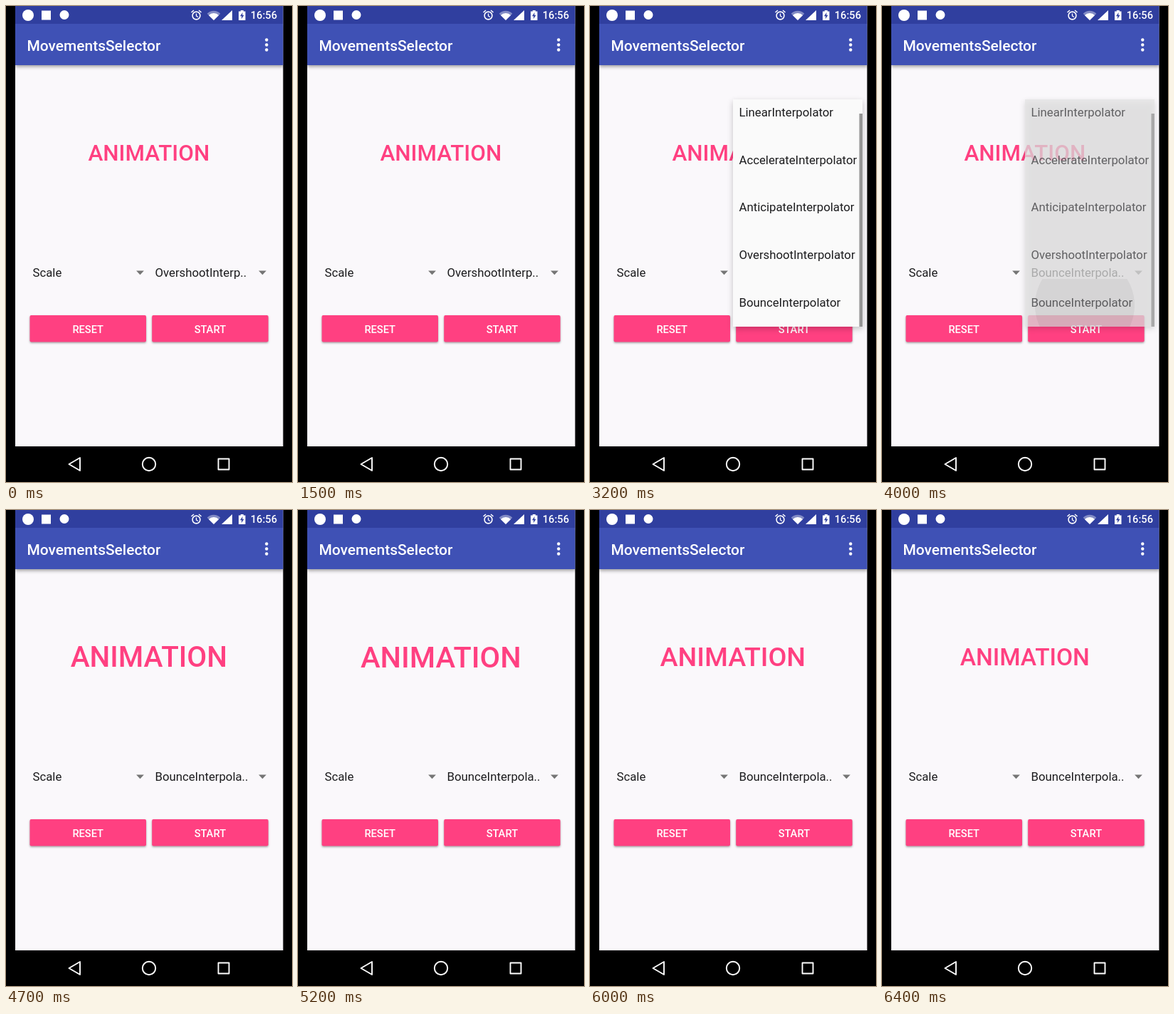
These frames come from a looping animation (402 px wide and 668 px high, 6.5 s). An HTML page with a canvas:

```html
<!DOCTYPE html>
<html lang="en">
<head>
<meta charset="utf-8">
<title>Interpolator demo</title>
<style>
  html, body { margin: 0; width: 100%; height: 100%; overflow: hidden; background: #000; }
  canvas { display: block; width: 402px; height: 668px; }
</style>
</head>
<body>
<canvas id="stage"></canvas>
<script>
const W = 402, H = 668, LOOP = 6500, STEP = 100;
const PINK = '#ff4081', INK = '#1c1c1e', SURFACE = '#faf8fb';
const ITEMS = ['Linear', 'Accelerate', 'Anticipate', 'Overshoot', 'Bounce'];
const POPUP = { x: 201, y: 131, w: 182, h: 319, open: 2480, close: 3930 };

const canvas = document.getElementById('stage');
const ctx = canvas.getContext('2d');
const dpr = window.devicePixelRatio || 1;
canvas.width = W * dpr;
canvas.height = H * dpr;

const clamp = v => Math.max(0, Math.min(1, v));
const smooth = v => v * v * (3 - 2 * v);

function rect(x, y, w, h, color) {
  ctx.fillStyle = color;
  ctx.fillRect(x, y, w, h);
}

function disc(x, y, r, color) {
  ctx.fillStyle = color;
  ctx.beginPath();
  ctx.arc(x, y, r, 0, Math.PI * 2);
  ctx.fill();
}

function ring(x, y, r, width) {
  ctx.lineWidth = width;
  ctx.beginPath();
  ctx.arc(x, y, r, 0, Math.PI * 2);
  ctx.stroke();
}

function trace(points) {
  ctx.beginPath();
  points.forEach(([x, y]) => ctx.lineTo(x, y));
}

function poly(points, color) {
  trace(points);
  ctx.fillStyle = color;
  ctx.fill();
}

function line(points, width) {
  trace(points);
  ctx.lineWidth = width;
  ctx.stroke();
}

function text(str, x, y, size, color, weight = 400, align = 'left') {
  ctx.font = `${weight} ${size}px Roboto, sans-serif`;
  ctx.textAlign = align;
  ctx.fillStyle = color;
  ctx.fillText(str, x, y);
}

function shadow(blur, dy, alpha) {
  ctx.shadowColor = `rgba(0,0,0,${alpha})`;
  ctx.shadowBlur = blur * dpr;
  ctx.shadowOffsetY = dy * dpr;
}

function fan(r, color) {
  ctx.fillStyle = color;
  ctx.beginPath();
  ctx.moveTo(292, 20);
  ctx.arc(292, 20, r, -Math.PI * 0.75, -Math.PI * 0.25);
  ctx.fill();
}

function drawStatusBar() {
  rect(13, 0, 376.5, 25, '#303f9f');
  disc(31, 13, 8, '#fff');
  rect(50, 6.5, 13, 13, '#fff');
  disc(82, 12.5, 6.5, '#fff');

  ctx.strokeStyle = '#fff';
  ring(267.5, 13.5, 5.4, 1.6);
  line([[267.5, 10.5], [267.5, 14], [270, 15.5]], 1.3);
  line([[260.5, 9], [264, 6]], 1.6);
  line([[271, 6], [274.5, 9]], 1.6);

  fan(13.2, 'rgba(255,255,255,.4)');
  fan(10, '#fff');
  poly([[303, 20], [318, 20], [318, 6]], '#fff');

  rect(327, 7.5, 9.5, 12.5, '#fff');
  rect(329.8, 6, 4, 2, '#fff');
  poly([[332.6, 9], [329, 14.3], [331.3, 14.3], [330.8, 18.3], [334.6, 12.8], [332.2, 12.8]], '#303f9f');
  text('16:56', 381, 18, 14.66, '#fff', 500, 'right');
}

function drawAppBar() {
  ctx.save();
  shadow(5, 2, 0.4);
  rect(13, 25, 376.5, 58, '#3f51b5');
  ctx.restore();
  drawStatusBar();
  text('MovementsSelector', 29.5, 62.6, 20.94, '#fff', 500);
  for (const y of [47.5, 54.5, 61.5]) disc(366.3, y, 2.2, '#fff');
}

function drawSpinner(label, x, arrow) {
  text(label, x, 380, 16.75, INK);
  poly([[arrow - 5.4, 371.6], [arrow + 5.4, 371.6], [arrow, 377.2]], '#757575');
}

function drawButton(label, x) {
  ctx.save();
  shadow(3, 1.5, 0.35);
  ctx.fillStyle = PINK;
  ctx.beginPath();
  ctx.roundRect(x, 434, 163.5, 37.5, 2);
  ctx.fill();
  ctx.restore();
  text(label, x + 81.7, 458.6, 14.66, '#fff', 500, 'center');
}

function drawNav() {
  rect(0, 618, W, 50, '#000');
  ctx.strokeStyle = '#fff';
  ctx.lineJoin = 'round';
  trace([[88.5, 643], [104, 634], [104, 652]]);
  ctx.closePath();
  ctx.lineWidth = 1.9;
  ctx.stroke();
  ring(201, 643, 9.2, 1.9);
  ctx.strokeRect(298.5, 635.5, 15, 15);
}

function bounce(p) {
  const u = p * 1.1226;
  const arc = (mid, base) => 8 * (u - mid) ** 2 + base;
  if (u < 0.3535) return arc(0, 0);
  if (u < 0.7408) return arc(0.54719, 0.7);
  if (u < 0.9644) return arc(0.8526, 0.9);
  return arc(1.0435, 0.95);
}

// Scale runs 1 -> 2 -> 1 along the bounce curve.
function titleScale(t) {
  const p = clamp((t - 4460) / 2000);
  return p === 1 ? 1 : 2 - Math.abs(2 * bounce(p) - 1);
}

function drawTitle(t) {
  const s = titleScale(t);
  ctx.save();
  ctx.translate(200.8, 206);
  ctx.scale(s, s);
  text('ANIMATION', 0, 11.2, 31.4, PINK, 500, 'center');
  ctx.restore();
}

// Clip grows from the anchor while the list slides to its final place.
function drawPopup(t) {
  const fadeIn = clamp((t - POPUP.open) / 130);
  const alpha = fadeIn * (1 - clamp((t - POPUP.close) / 200));
  if (alpha <= 0) return;

  const rest = 1 - smooth(clamp((t - POPUP.open) / 250));
  const dx = -4 * rest, dy = 84 * rest;
  const x = POPUP.x + dx + 4 * rest;
  const right = POPUP.x + POPUP.w + dx - 5 * rest;
  const y = POPUP.y + dy + 127 * rest;
  const bottom = POPUP.y + POPUP.h + dy - 129 * rest;
  const w = right - x, h = bottom - y;

  ctx.save();
  ctx.globalAlpha = alpha;
  ctx.save();
  shadow(8, 3, 0.8);
  rect(x, y, w, h, 'rgba(0,0,0,.28)');
  ctx.restore();
  rect(x, y, w, h, '#fafafa');

  ctx.beginPath();
  ctx.rect(x, y, w, h);
  ctx.clip();
  ctx.translate(dx, dy);
  ITEMS.forEach((name, i) =>
    text(name + 'Interpolator', 209.5, 154.8 + i * 66.8, 16.75, INK));
  rect(378.5, 151, 4.5, 299, 'rgba(0,0,0,.4)');

  if (t >= 3650) {
    ctx.beginPath();
    ctx.rect(201, 383, 177.5, 67);
    ctx.clip();
    disc(285, 420, Math.min(70, 40 + (t - 3650) * 0.5), 'rgba(0,0,0,.08)');
  }
  ctx.restore();
}

function draw(t) {
  ctx.setTransform(dpr, 0, 0, dpr, 0, 0);
  rect(0, 0, W, H, '#000');
  rect(13, 0, 376.5, 618, SURFACE);
  drawAppBar();
  drawSpinner('Scale', 37.5, 188.5);
  drawSpinner(t < POPUP.close ? 'OvershootInterp..' : 'BounceInterpola..', 209.5, 360.5);
  drawButton('RESET', 33.5);
  drawButton('START', 205.2);
  drawTitle(t);
  drawPopup(t);
  if (t >= 2200 && t < 2700) disc(333, 372, 12.5, 'rgba(255,255,255,.75)');
  drawNav();
}

const start = performance.now();
function tick() {
  const t = (performance.now() - start) % LOOP;
  draw(Math.floor(t / STEP) * STEP);
  requestAnimationFrame(tick);
}
tick();
</script>
</body>
</html>
```
